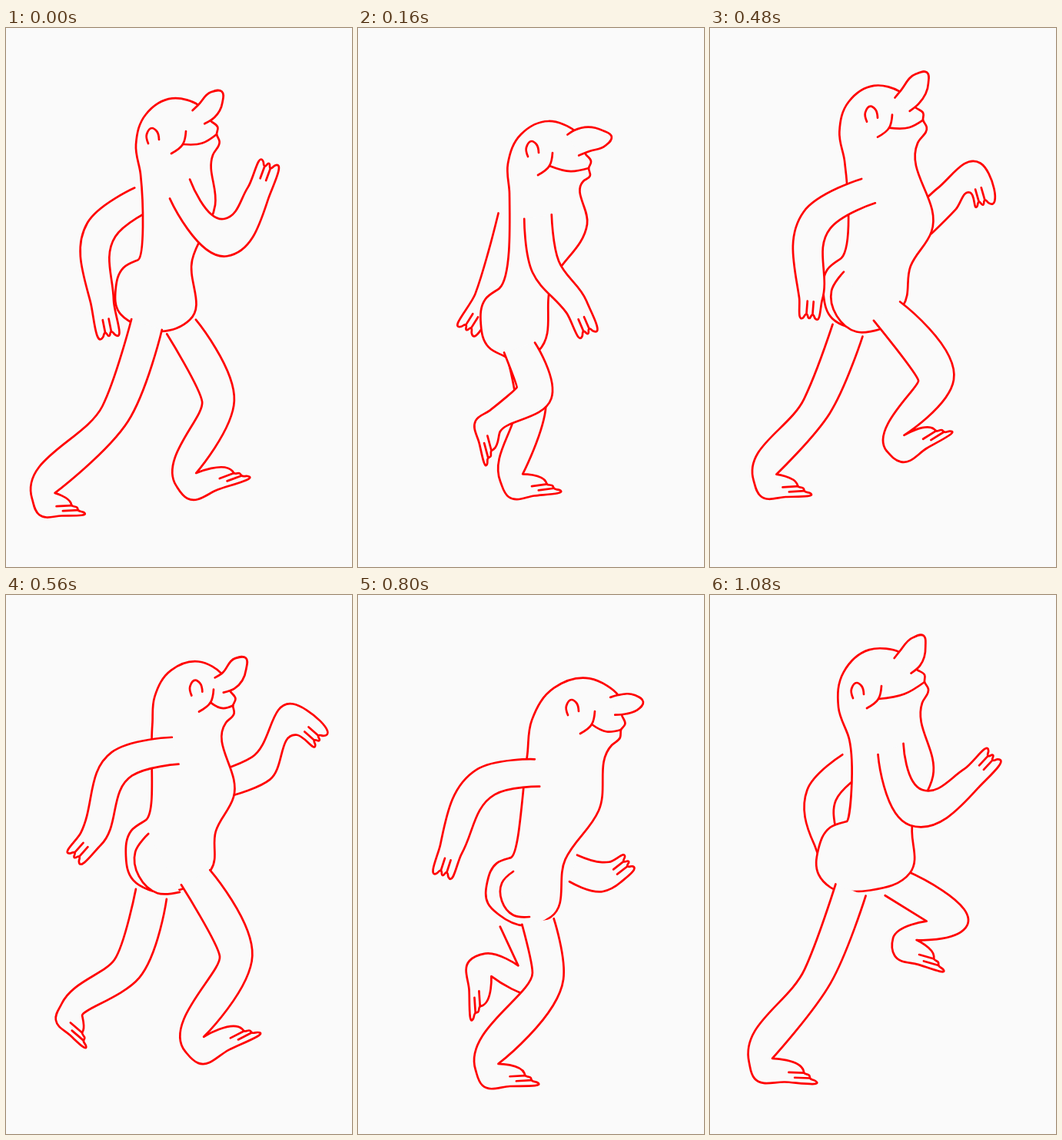
Animation, 450 px wide and 700 px high, one loop 1.12 s. Source, as an HTML page with a canvas:

```html
<!DOCTYPE html>
<html lang="en">
<head>
<meta charset="utf-8">
<title>Walk cycle</title>
<style>
  html, body { margin: 0; width: 100%; height: 100%; overflow: hidden; background: #fafafa; }
  canvas { display: block; }
</style>
</head>
<body>
<canvas id="stage" width="450" height="700"></canvas>
<script>
const LOOP = 1120, STEP = 40;
const INK = '#ff0000', PAPER = '#fafafa';

// Joints of the rig at the key poses:
// head  - nape, brow, nose, lip, dimple, ear
// torso - throat, chest, crotch, rump, small of the back
// arms  - shoulder, elbow, wrist, fingertips
// legs  - hip, knee, heel, toes
const poses = [
  { t: 0, head: '175,190 250,100 274,90 274,138 230,151 190,130', torso: '269,165 272,230 239,379 164,383 172,301',
    farArm: '178,222 124,262 125,355 134,400', nearArm: '226,209 286,272 328,214 342,176',
    farLeg: '228,388 276,485 236,611 314,582', nearLeg: '183,385 142,501 43,632 101,629' },
  { t: 160, head: '197,215 281,133 320,143 300,182 249,179 226,147', torso: '293,199 298,255 235,419 190,426 184,338',
    farArm: '200,245 187,295 166,352 141,392', nearArm: '234,245 244,310 284,362 299,397',
    farLeg: '215,425 225,490 196,609 262,600', nearLeg: '210,415 229,474 153,510 168,566' },
  { t: 320, head: '182,193 251,96 275,87 281,137 228,153 199,126', torso: '279,172 289,262 252,389 172,403 170,330',
    farArm: '250,255 280,272 306,284 303,329', nearArm: '213,221 171,270 195,358 205,389',
    farLeg: '193,405 173,490 96,609 165,602', nearLeg: '222,391 276,431 195,464 234,519' },
  { t: 480, head: '175,183 247,93 276,76 277,130 233,140 209,112', torso: '270,160 288,275 251,371 180,398 171,309',
    farArm: '275,265 308,232 345,205 355,240', nearArm: '206,222 139,260 131,362 129,387',
    farLeg: '179,402 139,496 66,608 130,604', nearLeg: '230,378 294,464 248,565 312,527' },
  { t: 640, head: '208,210 317,162 337,156 317,208 299,192 282,162', torso: '306,224 305,300 279,400 190,416 194,333',
    farArm: '300,283 341,289 388,204 433,208', nearArm: '235,236 170,238 106,323 69,337',
    farLeg: '201,422 185,499 76,503 90,568', nearLeg: '259,410 296,498 236,638 322,617' },
  { t: 800, head: '220,209 338,130 361,140 342,175 304,168 278,136', torso: '330,195 313,280 251,418 183,415 199,341',
    farArm: '280,355 318,366 334,360 352,346', nearArm: '233,231 166,243 121,330 110,364',
    farLeg: '205,425 226,500 145,475 150,550', nearLeg: '234,424 247,495 162,637 233,633' },
  { t: 1080, head: '181,187 246,74 272,61 279,113 219,135 191,114', torso: '276,140 290,235 260,361 157,380 178,294',
    farArm: '185,220 145,260 150,320 158,345', nearArm: '235,200 268,276 340,238 368,208',
    farLeg: '241,374 307,428 240,468 303,486', nearLeg: '183,383 140,495 58,628 137,631' }
];

// Vector helpers. along(p, v, a, w, b) is p + a·v + b·w.
const along = (p, ...terms) => {
  const r = [...p];
  for (let i = 0; i < terms.length; i += 2) {
    r[0] += terms[i][0] * terms[i + 1];
    r[1] += terms[i][1] * terms[i + 1];
  }
  return r;
};
const dist = (p, q) => Math.hypot(q[0] - p[0], q[1] - p[1]);
const unit = v => { const l = Math.hypot(...v) || 1; return [v[0] / l, v[1] / l]; };
const dir = (p, q) => unit([q[0] - p[0], q[1] - p[1]]);
const normal = d => [d[1], -d[0]];
const mid = (p, q) => [(p[0] + q[0]) / 2, (p[1] + q[1]) / 2];

const parse = s => s.split(' ').map(p => p.split(',').map(Number));

// Arms turn about their joints, so they are keyed as a root plus angles and lengths.
function toPolar(pts) {
  const v = [...pts[0]];
  for (let i = 1; i < pts.length; i++) {
    const [p, q] = [pts[i - 1], pts[i]];
    v.push(Math.atan2(q[1] - p[1], q[0] - p[0]), dist(p, q));
  }
  return v;
}
function fromPolar(v) {
  const pts = [[v[0], v[1]]];
  for (let i = 2; i < v.length; i += 2) {
    pts.push(along(pts[pts.length - 1], [Math.cos(v[i]), Math.sin(v[i])], v[i + 1]));
  }
  return pts;
}
const fromFlat = v => v.flatMap((x, i) => i % 2 ? [] : [[x, v[i + 1]]]);

function makeTrack(name) {
  const polar = name.endsWith('Arm');
  const keys = poses.map(p => ({ t: p.t, v: polar ? toPolar(parse(p[name])) : parse(p[name]).flat() }));
  if (polar) {
    for (let i = 1; i < keys.length; i++) {
      for (let j = 2; j < keys[i].v.length; j += 2) {
        const turn = keys[i].v[j] - keys[i - 1].v[j];
        keys[i].v[j] -= Math.round(turn / (2 * Math.PI)) * 2 * Math.PI;
      }
    }
  }
  return { keys, build: polar ? fromPolar : fromFlat };
}
const tracks = Object.fromEntries(
  Object.keys(poses[0]).filter(k => k !== 't').map(k => [k, makeTrack(k)]));

// Cyclic cubic interpolation through the keys.
function sample(keys, t) {
  const n = keys.length;
  const key = i => {
    const turn = Math.floor(i / n), k = keys[i - turn * n];
    return { t: k.t + turn * LOOP, v: k.v };
  };
  let i = n - 1;
  while (keys[i].t > t) i--;
  const [a, b, c, d] = [key(i - 1), key(i), key(i + 1), key(i + 2)];
  const span = c.t - b.t, u = (t - b.t) / span, u2 = u * u, u3 = u2 * u;
  return b.v.map((p, j) => {
    const m0 = (c.v[j] - a.v[j]) / (c.t - a.t) * span;
    const m1 = (d.v[j] - p) / (d.t - b.t) * span;
    return (2 * u3 - 3 * u2 + 1) * p + (u3 - 2 * u2 + u) * m0
      + (3 * u2 - 2 * u3) * c.v[j] + (u3 - u2) * m1;
  });
}

// The trunk sinks as a foot lands and springs up before the next step.
const bump = (t, centre, reach) =>
  Math.abs(t - centre) < reach ? Math.cos((t - centre) / reach * Math.PI / 2) ** 2 : 0;
const bob = t => 20 * bump(t, 80, 80) - 30 * bump(t, 540, 100);

function joints(name, t) {
  const { keys, build } = tracks[name], lift = bob(t);
  return build(sample(keys, t)).map(([x, y]) =>
    [x, y + lift * Math.min(1, Math.max(0, (600 - y) / 220))]);
}

const ctx = document.getElementById('stage').getContext('2d');
ctx.lineCap = ctx.lineJoin = 'round';
ctx.lineWidth = 2.7;
ctx.strokeStyle = INK;
ctx.fillStyle = PAPER;

// Smooth curve through the points; a corner gets sharper the more it turns.
function shape(pts, { corners = [], closed = false, fill = false } = {}) {
  const n = pts.length;
  const tangents = pts.map((p, i) => {
    if (!closed && (i === 0 || i === n - 1)) return [0, 0];
    const a = pts[(i + n - 1) % n], b = pts[(i + 1) % n];
    const din = dir(a, p), dout = dir(p, b);
    const tan = unit(along([0, 0], din, dist(p, b), dout, dist(a, p)));
    const soft = corners.includes(i) ? Math.max(0, din[0] * dout[0] + din[1] * dout[1]) ** 2 : 1;
    return [tan[0] * soft, tan[1] * soft];
  });
  ctx.beginPath();
  ctx.moveTo(...pts[0]);
  for (let i = 0; i < (closed ? n : n - 1); i++) {
    const j = (i + 1) % n, p = pts[i], q = pts[j], h = dist(p, q) * 0.36;
    ctx.bezierCurveTo(...along(p, tangents[i], h), ...along(q, tangents[j], -h), ...q);
  }
  if (closed) ctx.closePath();
  if (fill) ctx.fill();
  ctx.stroke();
}

// Sideways offset at a joint, along the bisector of the bend.
function girth(a, b, c, w) {
  const n1 = normal(dir(a, b)), n2 = normal(dir(b, c));
  const m = unit(along(n1, n2, 1));
  const k = w * Math.min(1.35, 1 / Math.max(0.1, m[0] * n1[0] + m[1] * n1[1]));
  return [m[0] * k, m[1] * k];
}

// Points bulging from the chord p-q to its left.
const bulge = (p, q, spots) => {
  const d = [q[0] - p[0], q[1] - p[1]];
  return spots.map(([a, b]) => along(p, d, a, normal(d), b));
};
const halfRound = depth => [1, 2, 3].map(k =>
  [(1 - Math.cos(k * Math.PI / 4)) / 2, depth * Math.sin(k * Math.PI / 4)]);

// Three digits; place(k) gives the spot across the hand or foot, k = 2..0.
function digits(place, back, notch, length) {
  const tips = [2, 1.5, 1, 0.5, 0].map(k => along(place(k), back, k % 1 ? notch : 0));
  const lines = [tips[1], tips[3]].map(p => [p, along(p, back, length)]);
  return { tips, lines };
}

function arm([s, e, w, tip]) {
  const hand = dir(w, tip), side = normal(hand), back = along([0, 0], hand, -1);
  const ns = along([0, 0], normal(dir(s, e)), 18);
  const ne = girth(s, e, w, 18), nw = girth(e, w, tip, 15);
  const { tips, lines } = digits(k => along(tip, side, (k - 1) * 8), back, 5, 17);
  shape([along(s, ns, 1), along(e, ne, 1), along(w, nw, 1), ...tips,
    along(w, nw, -1), along(e, ne, -1), along(s, ns, -1)], { fill: true });
  lines.forEach(l => shape(l));
}

function leg([hip, knee, heel, toe]) {
  const f = dir(heel, toe), up = normal(f), back = along([0, 0], f, -1);
  const front = along(heel, f, 22, up, 27), rear = along(heel, f, -8, up, 21);
  const nh = along([0, 0], normal(dir(hip, knee)), 21);
  const nk = girth(hip, knee, mid(front, rear), 19);
  const { tips, lines } = digits(k => along(toe, f, -8 * k, up, 6.5 * k), back, 3, 20);
  const sole = along(mid(heel, toe), up, -3);
  shape([along(hip, nh, 1), along(knee, nk, 1), front, ...tips, sole, heel, rear,
    along(knee, nk, -1), along(hip, nh, -1)], { fill: true, corners: [2, 11] });
  lines.forEach(l => shape(l));
}

function trunk([nape, brow, , lip], [throat, chest, crotch, rump, small], rearView) {
  const e = dir(brow, lip), g = normal(e).map(x => x);
  const dome = bulge(nape, brow, [[0.22, 0.25], [0.55, 0.38], [0.87, 0.27]]);
  const [belly] = bulge(chest, crotch, [[0.5, -0.09]]);
  const seat = along(mid(crotch, rump), [0, 1], 13);
  shape([nape, ...dome, brow, along(lip, e, -18, g, 3), along(lip, e, -7, g, 6), lip,
    along(lip, e, 10, g, -2), throat, chest, belly, crotch, seat,
    rump, ...bulge(rump, small, halfRound(0.31)), small],
  { closed: true, fill: true, corners: [0, 4, 5, 7, 14, 18] });
  if (rearView) {
    const top = along(small, [3, 18], 1), end = along(rump, [40, 3], 1);
    shape([end, ...bulge(end, top, halfRound(0.43)), top], { fill: true });
  }
}

function face([, brow, nose, lip, dimple, ear]) {
  const e = dir(brow, lip), g = normal(e);
  const from = (p, ...offsets) => offsets.map(o => along(p, o, 1));
  shape([lip, along(mid(lip, dimple), e, 6), dimple]);
  shape(from(dimple, [4, -17], [0, 0], [-15, 12]));
  shape(from(ear, [-5, 20], [-7, 8], [0, 0], [6, 4], [9, 15]));

  const nostril = along(lip, e, -20, g, -6);
  const d = dir(mid(brow, nostril), nose), n = normal(d);
  shape([along(brow, g, -10, e, 2), brow, along(nose, n, 10), along(nose, d, 10),
    along(nose, n, -10), along(lip, e, -20, g, 9), nostril], { fill: true });
}

function draw(t) {
  const head = joints('head', t);
  ctx.fillRect(0, 0, 450, 700);
  arm(joints('farArm', t));
  leg(joints('farLeg', t));
  trunk(head, joints('torso', t), t >= 240 && t < 960);
  face(head);
  leg(joints('nearLeg', t));
  arm(joints('nearArm', t));
}

const start = performance.now();
function tick() {
  const t = (performance.now() - start) % LOOP;
  draw(Math.floor(t / STEP) * STEP);
  requestAnimationFrame(tick);
}
tick();
</script>
</body>
</html>
```
